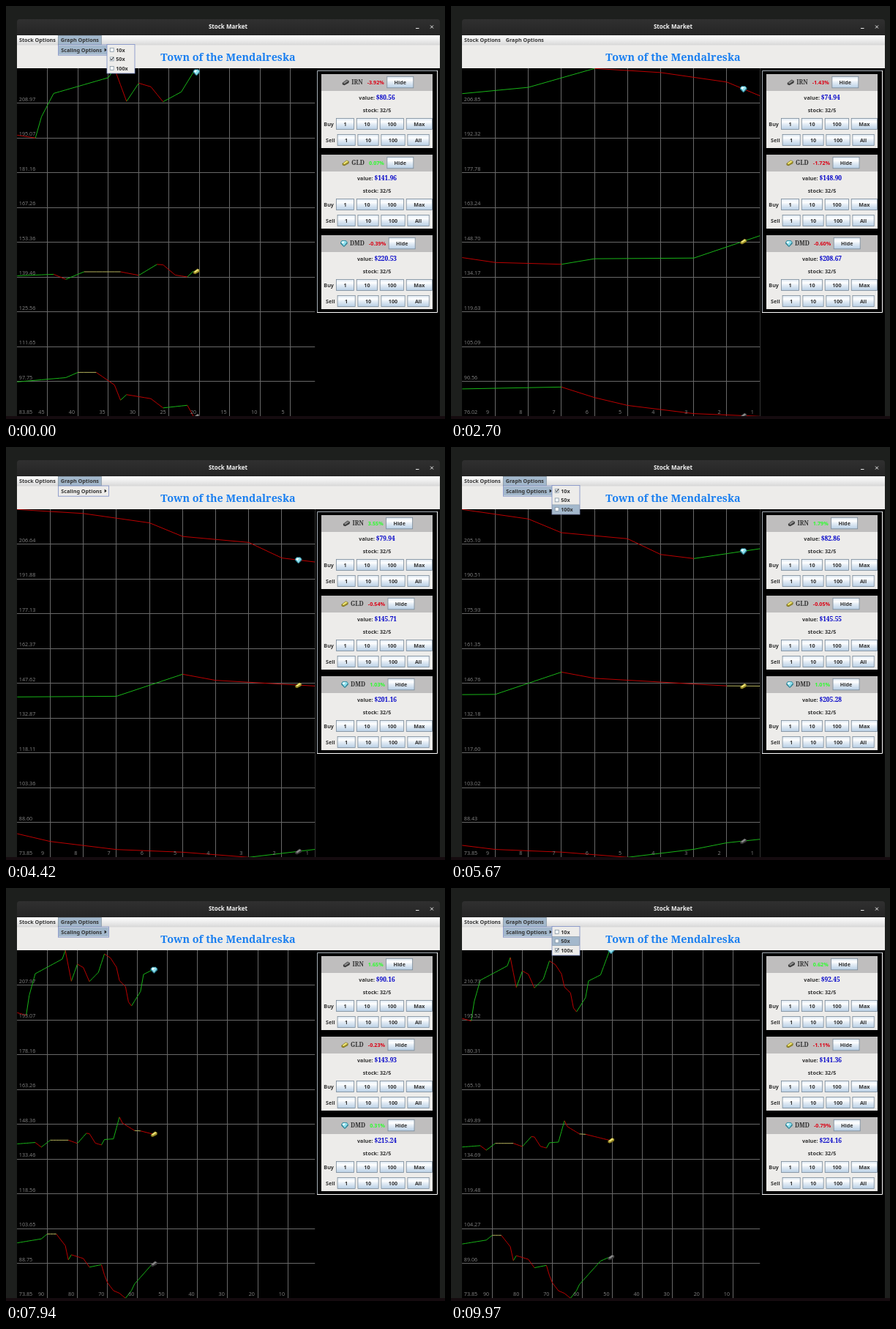
An HTML page for the animation above (10000 ms loop, 600 by 564 pixels).

```html
<!DOCTYPE html>
<html lang="en">
<head>
<meta charset="utf-8">
<title>Stock Market</title>
<style>
  html, body { margin: 0; width: 100%; height: 100%; overflow: hidden; background: #1d1f1d; }
  svg { display: block; width: 100vw; height: 100vh; }
  text { font: bold 7.2px "Noto Sans", "Open Sans", sans-serif; fill: #333; white-space: pre; }
  .serif { font: bold 8.4px "Noto Serif", serif; }
  .ticker { font-size: 8.1px; }
  .town { font: bold 14.4px "Noto Serif", serif; fill: #1a7ff0; }
  .bar { font-size: 8px; fill: #f2f2f2; }
  .axis { font-weight: 400; fill: #7c7c7c; }
  .price { fill: #0000c8; }
  .mid { text-anchor: middle; }
</style>
</head>
<body>
<svg id="stage" viewBox="0 0 600 564">
  <defs>
    <linearGradient id="btn" x2="0" y2="1">
      <stop offset="0" stop-color="#dde8f3"/><stop offset=".3" stop-color="#fff"/>
      <stop offset=".5" stop-color="#e6eef6"/><stop offset="1" stop-color="#b8cfe5"/>
    </linearGradient>
    <linearGradient id="menubar" x2="0" y2="1">
      <stop offset="0" stop-color="#fff"/><stop offset="1" stop-color="#dadada"/>
    </linearGradient>
    <linearGradient id="titlebar" x2="0" y2="1">
      <stop offset="0" stop-color="#303030"/><stop offset="1" stop-color="#242424"/>
    </linearGradient>
    <clipPath id="plot"><rect x="15" y="85" width="407.5" height="475"/></clipPath>
    <g id="IRN">
      <path d="M-4.6 1 1.4-3.6 4.6-1.8 4.2 1-1.8 4.2-4.4 3.2Z" fill="#3a3a3a"/>
      <path d="M-3.6.9 1.5-2.8 3.7-1.6-1.5 2.2Z" fill="#8c8c8c"/>
    </g>
    <g id="GLD">
      <path d="M-4.6 1 1.4-3.6 4.6-1.8 4.2 1-1.8 4.2-4.4 3.2Z" fill="#6e641a"/>
      <path d="M-3.8.9 1.5-2.9 3.9-1.6-1.6 2.2Z" fill="#eee474"/>
      <path d="M-3.8 1.8-1.6 2.8 3.8-.7 3.6.6-1.8 3.6-3.7 2.8Z" fill="#b8a62c"/>
    </g>
    <g id="DMD">
      <path d="M-2.5-4H2.5L4.7-1.5V.5L.5 4.7H-.5L-4.7.5V-1.5Z" fill="#2c7f92"/>
      <path d="M-2.2-3.2H2.2L4-1.2 0 3.8-4-1.2Z" fill="#8fe0ee"/>
      <path d="M-2-2.6H1L-1.5.8-3.3-1Z" fill="#f0ffff"/>
    </g>
  </defs>
</svg>
<script>
const LOOP = 10000, TICK = 500;
const LEFT = 15, TOP = 85, WIDTH = 407, ROWS = 10, ROW = 47.5;
const UP = '#18b418', DOWN = '#bc0000', FLAT = '#b5b25c';

// turning points [tick, value]; prices run straight between them
const stocks = [
  { id: 'IRN', turns: [
    [0, 97.6], [8, 99.3], [10, 101.4], [13, 101.4], [16, 96.4], [17, 90.3], [18, 92.5], [22, 90.9], [24, 87.2], [28, 88.25],
    [29, 83.85], [30, 80.56], [32, 77.14], [34, 76.02], [36, 73.85], [38, 77.2], [39, 79.94], [46, 90.16], [50, 92.45]] },
  { id: 'GLD', turns: [
    [0, 140], [6, 140.6], [8, 138.6], [11, 141.6], [17, 141.6], [20, 140.2], [23, 144.56], [24, 144.4], [26, 140.3],
    [28, 139.55], [29, 141.87], [32, 142.15], [34, 151.5], [35, 148.9], [39, 145.71], [41, 145.55], [49, 142.95], [50, 141.36]] },
  { id: 'DMD', turns: [
    [0, 196.2], [3, 195.1], [4, 203.6], [6, 212.9], [15, 219.2], [16, 222.87], [18, 209.7], [20, 217], [22, 215.55], [24, 209.55],
    [27, 213.5], [29, 221.39], [31, 219.68], [33, 215.7], [34, 209.94], [36, 207.4], [37, 200.8], [38, 199.1],
    [41, 205.28], [42, 212.6], [46, 215.24], [49, 225.94], [50, 224.16]] }
];

// each visit to the menu: it opens, the pointer settles on an item, a click closes it
const scales = [10, 50, 100];
const visits = [
  { open: -1150, close: 720, item: 0 },
  { open: 4360, close: 5790, item: 2 },
  { open: 7740, close: LOOP, item: 1 }
];
const stall = { from: 5820, to: 6670 };

const stage = document.getElementById('stage');

function el(name, attrs, parent = stage, text) {
  const node = document.createElementNS('http://www.w3.org/2000/svg', name);
  for (const key in attrs) node.setAttribute(key, attrs[key]);
  if (text !== undefined) node.textContent = text;
  parent.appendChild(node);
  return node;
}
const rect = (x, y, width, height, fill, parent, extra) =>
  el('rect', { x, y, width, height, fill, ...extra }, parent);
const label = (x, y, text, cls = '', parent) => el('text', { x, y, class: cls }, parent, text);
const path = (d, stroke, parent, extra) => el('path', { d, stroke, fill: 'none', ...extra }, parent);
const place = (node, x, y) => node.setAttribute('transform', `translate(${x} ${y})`);
const crisp = x => Math.floor(x + .2) + .5;

function price({ turns }, i) {
  const next = turns.findIndex(([at]) => at >= i);
  if (next < 1) return turns[0][1];
  const [[a, from], [b, to]] = turns.slice(next - 1, next + 1);
  return from + (to - from) * (i - a) / (b - a);
}

function button(x, y, w, h, text, parent) {
  rect(x + .5, y + .5, w - 1, h - 1, 'url(#btn)', parent, { stroke: '#7a8a99', 'stroke-width': .8 });
  label(x + w / 2, y + h / 2 + 2.6, text, 'mid', parent);
}

function drawWindow() {
  rect(0, 0, 600, 564, '#1d1f1d');
  rect(0, 560, 600, 4, '#150b0f');
  path('M15 41V22Q15 18 19 18H589Q593 18 593 22V41Z', 'none', stage, { fill: 'url(#titlebar)' });
  label(303.5, 31.2, 'Stock Market', 'bar mid');
  path('M560 30.5H564.5M580 26.5L584 30.5M584 26.5L580 30.5', '#e8e8e8');
  rect(15, 40, 578, 13, 'url(#menubar)');
  rect(15, 53, 578, 32, '#edecea');
  path('M15 53H593', '#d2d2d2', stage, { 'stroke-width': .6 });
  label(303.5, 75, 'Town of the Mendalreska', 'town mid');
  rect(15, 85, 578, 475, '#000');
  path('M425.5 419V88.5H590', '#a4adb5');
  path('M589.5 88V418.5H425', '#fff');
}

function drawCard(stock, i) {
  const g = el('g', { transform: `translate(0 ${i * 110})` });
  rect(431, 93, 152, 101, '#edecea', g);
  rect(431, 93, 152, 23, '#bfbebe', g);
  stock.icon = el('use', { href: '#' + stock.id }, g);
  stock.name = label(0, 107.4, stock.id, 'serif ticker', g);
  stock.pct = label(0, 106.6, '', '', g);
  stock.hide = el('g', {}, g);
  button(0, 95.8, 37, 16.5, 'Hide', stock.hide);
  const line = el('text', { x: 507, y: 127.8, class: 'mid' }, g);
  el('tspan', {}, line, 'value: ');
  stock.price = el('tspan', { class: 'serif price' }, line);
  label(507, 144.6, 'stock: 32/5', 'mid', g);
  buttonRow(434.3, 153, ['Buy', '1', '10', '100', 'Max'], g);
  buttonRow(437, 175, ['Sell', '1', '10', '100', 'All'], g);
}

function buttonRow(x, y, [title, ...names], g) {
  const text = label(x, y + 10.6, title, '', g);
  x += text.getComputedTextLength() + 3;
  for (const name of names) {
    const probe = label(0, 0, name, '', g);
    const w = probe.getComputedTextLength() + 21;
    probe.remove();
    button(x, y, w, 16, name, g);
    x += w + 2.7;
  }
}

function updateCard(stock, n) {
  const now = price(stock, n + 1);
  const change = (now / price(stock, n) - 1) * 100;
  stock.price.textContent = '$' + now.toFixed(2);
  stock.pct.textContent = change.toFixed(2) + '%';
  stock.pct.style.fill = change < 0 ? '#dc0014' : '#2cff2c';
  const nameW = stock.name.getComputedTextLength();
  const pctW = stock.pct.getComputedTextLength();
  let x = 508.3 - (nameW + pctW + 59.5) / 2;
  place(stock.icon, x + 5, 104);
  stock.name.setAttribute('x', x += 13);
  stock.pct.setAttribute('x', x += nameW + 6);
  place(stock.hide, x + pctW + 3.5, 0);
}

function drawGraph(n, scale) {
  graph.replaceChildren();
  const full = n >= scale;
  const first = full ? n - scale + 1 : 0;
  const runs = stocks.map(s => Array.from({ length: n - first + 1 }, (_, k) => price(s, first + k)));
  const max = Math.max(...runs.flat()), min = Math.min(...runs.flat());
  const gap = WIDTH / (scale - 1);
  const px = k => LEFT + k * gap + .3;
  const py = v => TOP + (max - v) / (max - min) * ROWS * ROW + .3;

  let grid = '';
  for (let r = 1; r < ROWS; r++) grid += `M15 ${crisp(TOP + r * ROW)}H422.5`;
  const every = scale / 10;
  for (let k = every; k < scale; k += every) grid += `M${crisp(LEFT + k * gap)} 85V560`;
  path(grid, '#686868', graph);

  const lines = { [UP]: '', [DOWN]: '', [FLAT]: '' };
  for (const run of runs) {
    run.slice(1).forEach((v, k) => {
      const rise = v / run[k] - 1;
      const colour = Math.abs(rise) < .0006 ? FLAT : rise > 0 ? UP : DOWN;
      lines[colour] += `M${px(k)} ${py(run[k])}L${px(k + 1)} ${py(v)}`;
    });
  }
  for (const colour in lines) path(lines[colour], colour, graph);

  for (let r = 1; r <= ROWS; r++)
    label(17.8, TOP + r * ROW - 2.6, (max - r * (max - min) / ROWS).toFixed(2), 'axis', graph);
  for (let k = every; k < scale; k += every)
    label(LEFT + k * gap - 12.2, 557.2, scale - k, 'axis', graph);

  runs.forEach((run, i) => {
    const [before, last] = run.slice(-2).map(py);
    const x = px(n - first) + (full ? -gap : gap) / 2;
    place(el('use', { href: '#' + stocks[i].id }, graph), x, full ? (before + last) / 2 : last);
  });
}

function drawMenu(scale, depth, lit) {
  const edge = { stroke: '#7b8dc6', 'stroke-width': .8 };
  const blue = '#a3b8cc';
  menu.replaceChildren();
  if (depth) {
    rect(71.3, 40.3, 59, 12.7, blue, menu, { stroke: '#7a8a99', 'stroke-width': .7 });
    rect(71.4, 53, 69, 14.2, '#edecea', menu, edge);
    if (depth > 1) rect(72, 54, 67.8, 12.4, blue, menu);
    path('M134.7 57.6L137.6 60.1 134.7 62.6Z', 'none', menu, { fill: '#222' });
    label(75.3, 62.8, 'Scaling Options', '', menu);
  }
  label(18, 48.8, 'Stock Options', '', menu);
  label(74.8, 48.8, 'Graph Options', '', menu);
  if (depth < 3) return;
  rect(138, 52.4, 38, 39.6, '#edecea', menu, edge);
  scales.forEach((s, i) => {
    const y = 53.7 + i * 12.6;
    if (i === lit) rect(138.6, y, 36.8, 12.4, blue, menu, { stroke: '#7a8a99', 'stroke-width': .5 });
    rect(142.2, y + 3.6, 5, 5, '#f4f8fc', menu, { stroke: '#7a8a99', 'stroke-width': .7 });
    if (s === scale) path(`M143.2 ${y + 5.6}l1.2 2 2.6-4`, '#222', menu);
    label(150.2, y + 8.9, s + 'x', '', menu);
  });
}

// depth: 0 closed, 1 menu, 2 entry lit, 3 submenu
function menuState(t) {
  const done = visits.filter(v => v.close <= t).pop();
  const visit = visits.find(v => v.open <= t && t < v.close);
  const age = visit ? t - visit.open : -1;
  return [
    done ? scales[done.item] : 50,
    age < 0 ? 0 : age < 120 ? 1 : age < 1050 ? 2 : 3,
    age > 1200 ? visit.item : -1
  ];
}

drawWindow();
stocks.forEach(drawCard);
const graph = el('g', { 'clip-path': 'url(#plot)' });
const menu = el('g', {});
let shownKey = '';

function render(time) {
  let t = time % LOOP;
  if (t > stall.from && t < stall.to) t = stall.from;
  const n = 29 + Math.floor(t / TICK + .5);
  const state = menuState(t);
  const key = [n, ...state].join();
  if (key === shownKey) return;
  shownKey = key;
  stocks.forEach(s => updateCard(s, n));
  drawGraph(n, state[0]);
  drawMenu(...state);
}

const begin = performance.now();
function frame() {
  render(performance.now() - begin);
  requestAnimationFrame(frame);
}
frame();
</script>
</body>
</html>
```
